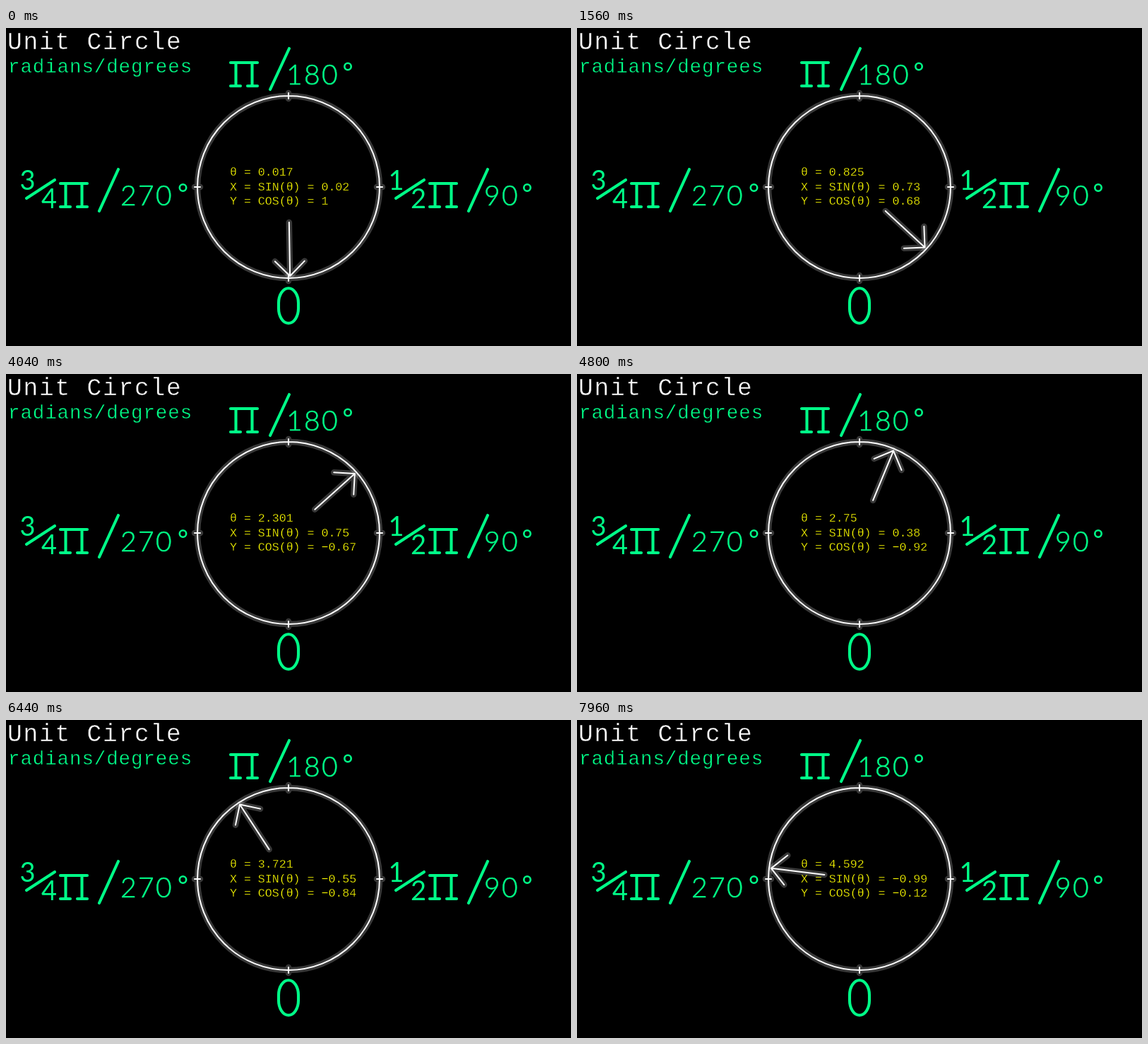
An HTML page that plays this animation: 800x450 px, repeating every 8000 ms.

```html
<!DOCTYPE html>
<html lang="en">
<head>
<meta charset="utf-8">
<title>Unit Circle</title>
<style>
  html, body { margin: 0; width: 100%; height: 100%; overflow: hidden; background: #000; }
  svg { display: block; width: 100vw; height: 100vh; }
  text { white-space: pre; font-family: "Liberation Mono", monospace; }
  .heading { stroke: #000; stroke-width: .4; }
  .values { fill: #ff0; stroke: #000; stroke-width: .3; font-size: 16.6px; }
  .labels { fill: none; stroke: #0f8; stroke-width: 4.1; stroke-linecap: round; stroke-linejoin: round; }
  .labels text { fill: #0f8; stroke-width: .6; font-family: Lato, sans-serif; font-size: 39px; font-weight: 300; letter-spacing: 2.4px; }
  .labels .fraction { font-size: 38px; font-weight: 400; letter-spacing: 0; stroke: none; }
  .degree { stroke-width: 2.6; }
  .glow, .line { fill: none; stroke: #fff; stroke-linecap: round; stroke-linejoin: round; }
  .glow { stroke-width: 8.5; stroke-opacity: .22; }
  .line { stroke-width: 2; }
</style>
</head>
<body>
<svg viewBox="0 0 800 450">
  <defs>
    <path id="pi" d="M2 2H40M9.500 2V35M32.500 2V35M2 35H16M26 35H40"/>
    <path id="dial" d="M400 96a129 129 0 0 1 0 258a129 129 0 0 1 0-258M400 92v8M400 350v8M267 225h8M525 225h8"/>
    <path id="pointer" d="M0 50V126M-21 105L0 126L21 105"/>
  </defs>

  <text class="heading" x="2" y="30" font-size="34.500" letter-spacing="1.800" fill="#fff">Unit Circle</text>
  <text class="heading" x="3" y="63" font-size="27.500" letter-spacing=".9" fill="#0f8">radians/degrees</text>

  <g class="labels">
    <use href="#pi" x="316" y="47"/>
    <path d="M374 87L401 29"/>
    <text x="397" y="80">180</text>
    <circle class="degree" cx="484" cy="54.500" r="4.700"/>

    <text class="fraction" x="19.500" y="229">3</text>
    <path d="M29 241L69 215"/>
    <text class="fraction" x="50" y="255">4</text>
    <use href="#pi" x="75" y="218"/>
    <path d="M132 259L159 200"/>
    <text x="162" y="251">270</text>
    <circle class="degree" cx="250.500" cy="226" r="4.700"/>

    <text class="fraction" x="541.500" y="229">1</text>
    <path d="M552 241L592 215"/>
    <text class="fraction" x="573" y="255">2</text>
    <use href="#pi" x="598" y="218"/>
    <path d="M655 259L682 200"/>
    <text x="677" y="251">90</text>
    <circle class="degree" cx="738" cy="226" r="4.700"/>

    <rect x="386" y="368.300" width="28" height="49.500" rx="14" ry="21"/>
  </g>

  <g class="values">
    <text id="theta" x="317" y="208.500"></text>
    <text id="sine" x="317" y="229.500"></text>
    <text id="cosine" x="317" y="250"></text>
  </g>

  <use href="#dial" class="glow"/>
  <use href="#dial" class="line"/>
  <g id="arrow">
    <use href="#pointer" class="glow"/>
    <use href="#pointer" class="line"/>
  </g>
</svg>
<script>
  const DURATION = 8000, STEP = 40;
  // [milliseconds, radians]; the angle advances at a slightly uneven rate
  const angleKeys = [
    [0, .017], [1560, .825], [2880, 1.608], [4040, 2.301],
    [4800, 2.75], [6440, 3.721], [7960, 4.592]
  ];
  const byId = id => document.getElementById(id);
  const [arrow, theta, sine, cosine] = ['arrow', 'theta', 'sine', 'cosine'].map(byId);

  function angleAt(time) {
    const next = Math.max(1, angleKeys.findIndex(([t]) => t >= time));
    const [t0, a0] = angleKeys[next - 1], [t1, a1] = angleKeys[next];
    return a0 + (a1 - a0) * (time - t0) / (t1 - t0);
  }

  const format = (value, digits) => String(+value.toFixed(digits) || 0).replace('-', '\u2212');

  function draw() {
    const time = Math.floor(performance.now() % DURATION / STEP) * STEP;
    const angle = angleAt(time);
    arrow.setAttribute('transform', `translate(400 225) rotate(${-angle * 180 / Math.PI})`);
    theta.textContent = `θ = ${format(angle, 3)}`;
    sine.textContent = `X = SIN(θ) = ${format(Math.sin(angle), 2)}`;
    cosine.textContent = `Y = COS(θ) = ${format(Math.cos(angle), 2)}`;
    requestAnimationFrame(draw);
  }
  draw();
</script>
</body>
</html>
```
